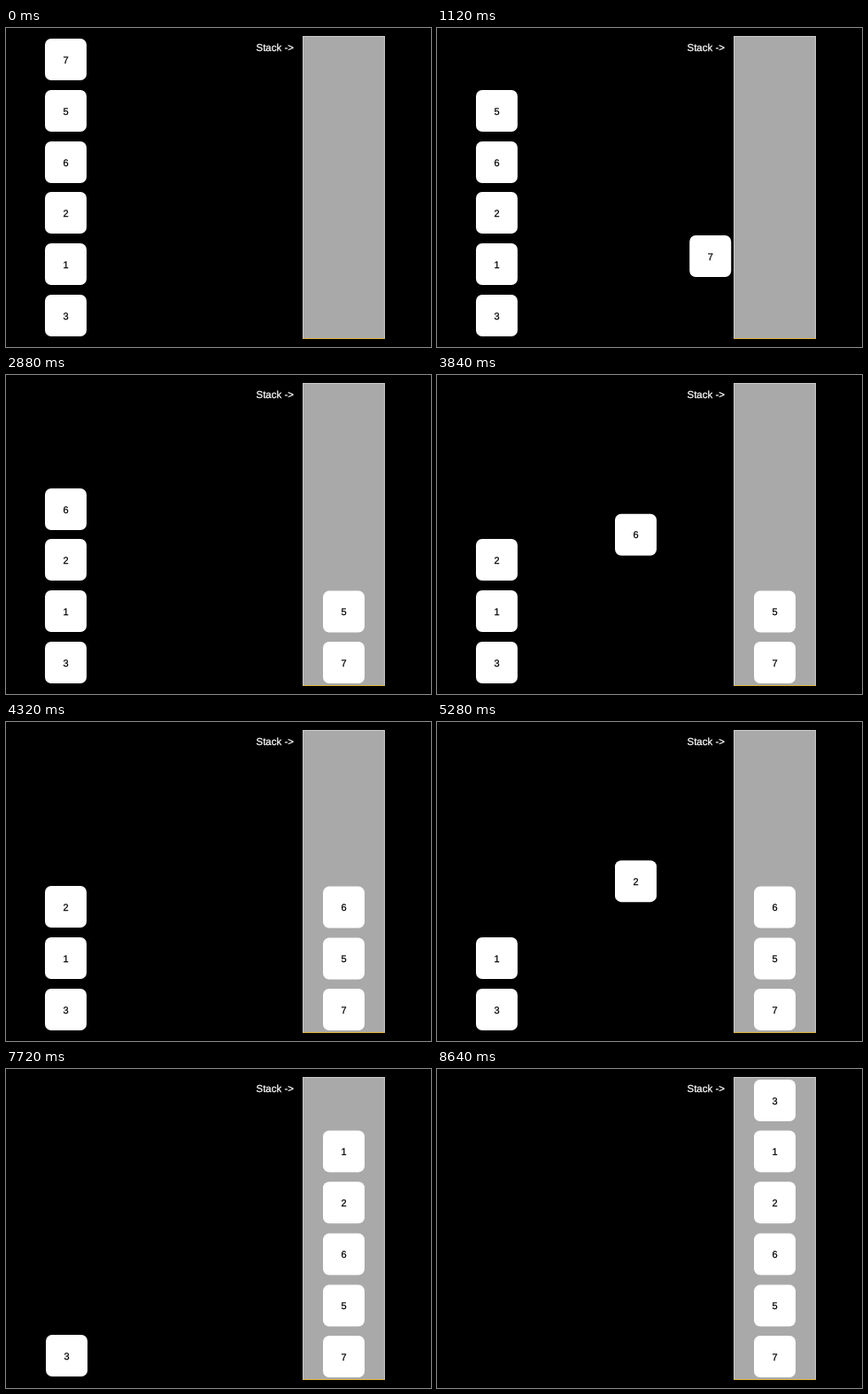
Write an HTML page that moves like this. It is 480 px wide and 360 px high and loops after 9.16 s.

```html
<!DOCTYPE html>
<html lang="en">
<head>
<meta charset="utf-8">
<title>Stack</title>
<style>
  html, body { margin: 0; width: 100%; height: 100%; overflow: hidden; background: #000; }
  svg { display: block; width: 480px; height: 360px; }
  text {
    font-family: "Liberation Sans", Arial, sans-serif;
    text-rendering: geometricPrecision;
    stroke-width: .25px;
  }
  .label { font-size: 11.5px; fill: #fff; stroke: #fff; }
  .block text { font-size: 11px; text-anchor: middle; fill: #000; stroke: #000; }
  .block rect { fill: #fff; }
</style>
</head>
<body>
<svg viewBox="0 0 480 360">
  <rect width="480" height="360"/>
  <text class="label" x="282.5" y="25.6">Stack -&gt;</text>
  <rect x="335.5" y="9.5" width="92" height="341" fill="#a9a9a9" stroke="#cbcbcb"/>
  <path d="M335 350.5H428" stroke="#dcb43c"/>
  <g id="blocks"></g>
</svg>
<script>
const LOOP = 9160, HOLD = 520, STEP = 40, STEPS = 24;
const TURN = HOLD + (STEPS - 1) * STEP;
const SIZE = 47, LEFT = 44, RIGHT = 358;
const queueY = [12, 70, 128, 185, 243, 301];
const stackY = [301, 243.6, 185.6, 127.3, 69.4, 12];

function make(name, attrs, parent) {
  const node = document.createElementNS("http://www.w3.org/2000/svg", name);
  for (const key in attrs) node.setAttribute(key, attrs[key]);
  return parent.appendChild(node);
}

const layer = document.getElementById("blocks");
const blocks = [7, 5, 6, 2, 1, 3].map(value => {
  const group = make("g", { class: "block" }, layer);
  make("rect", { width: SIZE, height: SIZE, rx: 7 }, group);
  make("text", { x: SIZE / 2, y: 27.5 }, group).textContent = value;
  return group;
});

// cubic-bezier(.42, 0, .58, 1), solved by bisection
function easeInOut(p) {
  if (p <= 0 || p >= 1) return p <= 0 ? 0 : 1;
  let low = 0, high = 1;
  for (let i = 0; i < 30; i++) {
    const s = (low + high) / 2, r = 1 - s;
    const x = 1.26 * s * r * r + 1.74 * s * s * r + s * s * s;
    if (x < p) low = s; else high = s;
  }
  return low * low * (3 - 2 * low);
}

function draw(time) {
  const t = time % LOOP;
  blocks.forEach((block, i) => {
    const step = Math.floor((t - HOLD - i * TURN) / STEP) + 1;
    const k = easeInOut(step / STEPS);
    const x = LEFT + (RIGHT - LEFT) * k;
    const y = queueY[i] + (stackY[i] - queueY[i]) * k;
    block.setAttribute("transform", `translate(${x.toFixed(3)} ${y.toFixed(3)})`);
  });
}

const start = performance.now();
function tick() {
  draw(performance.now() - start);
  requestAnimationFrame(tick);
}
tick();
</script>
</body>
</html>
```
